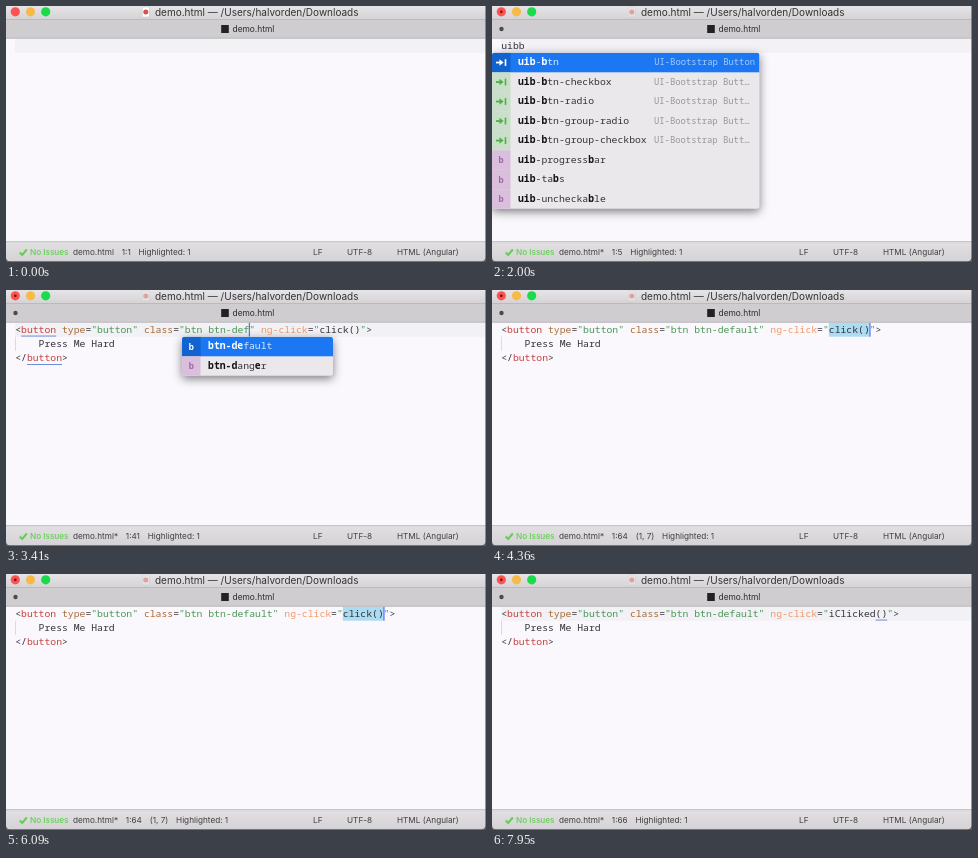
An HTML page with a canvas for the animation above (8 s loop, 480 by 256 pixels).

```html
<!DOCTYPE html>
<html lang="en">
<head>
<meta charset="utf-8">
<style>
  html, body { margin: 0; width: 100%; height: 100%; overflow: hidden; background: #faf8fd; }
  canvas { display: block; width: 480px; height: 256px; }
</style>
</head>
<body>
<canvas id="stage"></canvas>
<script>
const canvas = document.getElementById('stage');
const ctx = canvas.getContext('2d');
const ratio = window.devicePixelRatio || 1;
canvas.width = 480 * ratio;
canvas.height = 256 * ratio;

const LOOP = 8000, LEFT = 9.2, CELL = 5.85, ROW = 19.5;
const EDITOR_TOP = 32.5, LINE = 14.2, STATUS_TOP = 235.4;
const UI = 'Inter, sans-serif';
const MONO = '"Noto Sans Mono", monospace';
const CODE = `500 9.75px ${MONO}`;
const INK = '#343238';

// Completion entries: name, then an optional description for snippets.
const accordion = 'UI-Bootstrap Acco…', button = 'UI-Bootstrap Butt…';
const allSnippets = [
  ['uib-accordion', accordion], ['uib-btn', 'UI-Bootstrap Button'],
  ['uib-alert', 'UI-Bootstrap Alert'], ['uib-accordion-', accordion],
  ['uib-accordion-group', accordion], ['uib-accordion-heading', accordion],
  ['uib-btn-checkbox', button], ['uib-btn-radio', button],
  ['uib-collapse', 'UI-Bootstrap Coll…'], ['uib-dropdown', 'UI-Bootstrap Drop…']
];
const buttonSnippets = [
  ['uib-btn', 'UI-Bootstrap Button'], ['uib-btn-checkbox', button],
  ['uib-btn-radio', button], ['uib-btn-group-radio', button],
  ['uib-btn-group-checkbox', button],
  ['uib-progressbar'], ['uib-tabs'], ['uib-uncheckable']
];
const buttonClasses = [['btn-default'], ['btn-danger']];
const imageClasses = [['img-circle']];

// Editor states in order of time.
const states = [];
const word = (at, text, list, query) =>
  states.push({ at, line: text, caret: text.length, list, query, start: 0 });

const openTag = (style, handler) =>
  `<button type="button" class="btn btn-${style}" ng-click="${handler}">`;

function editClass(at, style, selected = 0, list, query) {
  states.push({ at, line: openTag(style, 'click()'), caret: 37 + style.length,
    selected, list, query, start: 33, full: true });
}
function editHandler(at, typed, tail = '', selected = 0, list) {
  states.push({ at, line: openTag('default', typed + tail), caret: 56 + typed.length,
    selected, list, query: typed, start: 56, full: true, paired: tail !== '' });
}

word(0, '');
word(330, 'u');
word(480, 'ui');
word(620, 'uib', allSnippets, 'uib');
word(1600, 'uibb', buttonSnippets, 'uibb');
editClass(2450, 'default', 7);
editClass(3120, 'd', 0, buttonClasses, 'btn-d');
editClass(3250, 'de', 0, buttonClasses, 'btn-de');
editClass(3370, 'def', 0, buttonClasses, 'btn-de');
editClass(3460, 'def', 0, buttonClasses.slice(0, 1), 'btn-def');
editClass(3900, 'default');
editHandler(4100, 'click()', '', 7);
editHandler(6200, 'i');
editHandler(6340, 'iC', '', 0, imageClasses);
editHandler(6480, 'iCl', '', 0, imageClasses);
['iCli', 'iClic', 'iClick', 'iClicke', 'iClicked'].forEach((typed, i) =>
  editHandler(6640 + i * 130, typed));
editHandler(7350, 'iClicked(', ')');

function box(x, y, w, h, color) {
  ctx.fillStyle = color;
  ctx.fillRect(x, y, w, h);
}
function disc(x, y, r, color) {
  ctx.fillStyle = color;
  ctx.beginPath();
  ctx.arc(x, y, r, 0, 7);
  ctx.fill();
}
function label(text, x, y, font, color) {
  ctx.font = font;
  ctx.fillStyle = color;
  ctx.fillText(text, x, y);
  return ctx.measureText(text).width;
}
function gradient(y, h, top, bottom) {
  const fill = ctx.createLinearGradient(0, y, 0, y + h);
  fill.addColorStop(0, top);
  fill.addColorStop(1, bottom);
  box(0, y, 480, h, fill);
}
const column = n => LEFT + n * CELL;

function drawChrome(modified) {
  gradient(0, 13, '#e6e4e6', '#d5d3d5');
  box(0, 13, 480, EDITOR_TOP - 13, '#cfcdcf');
  box(0, 13, 480, 0.7, '#b5b3b5');
  box(0, EDITOR_TOP - 0.8, 480, 0.8, '#b7b5b9');
  ['#fc5350', '#f7ba47', '#1bdb4a'].forEach((c, i) => disc(9.3 + i * 15.2, 5.8, 4.6, c));
  if (modified) disc(9.3, 5.8, 1.4, '#7c1210');

  ctx.globalAlpha = modified ? 0.45 : 1;
  box(136, 0.8, 7.6, 10.4, '#bbb9bb');
  box(136.4, 1.2, 6.8, 9.6, '#fff');
  disc(139.8, 6, 2.5, '#d9534a');
  ctx.globalAlpha = 1;
  label('demo.html — /Users/halvorden/Downloads', 149, 9.6, `10px ${UI}`, '#343234');

  box(215.2, 19, 7.6, 8, '#222');
  label('demo.html', 226.5, 26.2, `8.4px ${UI}`, '#2c2a2c');
  if (modified) disc(9.5, 23, 2.2, '#4b494b');
}

function drawStatus(state, saved) {
  const font = `8.2px ${UI}`, y = 249.3;
  gradient(STATUS_TOP, 256 - STATUS_TOP, '#e2e0e2', '#d4d2d4');
  box(0, STATUS_TOP, 480, 0.8, '#bab8ba');
  ctx.strokeStyle = '#62cf52';
  ctx.lineWidth = 2;
  ctx.beginPath();
  ctx.moveTo(13.7, 246.5);
  ctx.lineTo(16.2, 249);
  ctx.lineTo(20.8, 243.5);
  ctx.stroke();
  label('No Issues', 24, y, `500 8.2px ${UI}`, '#62cf52');

  const parts = [saved ? 'demo.html' : 'demo.html*', `1:${state.caret + 1}`];
  if (state.selected) parts.push(`(1, ${state.selected})`);
  parts.push('Highlighted: 1');
  let x = 67;
  for (const part of parts) x += label(part, x, y, font, '#403e40') + 7.8;
  label('LF', 307, y, font, '#403e40');
  label('UTF-8', 341, y, font, '#403e40');
  label('HTML (Angular)', 391, y, font, '#403e40');
}

// Dark surroundings showing past the window's right and bottom edges.
function drawWindowEdge() {
  ctx.fillStyle = '#5a585a';
  ctx.beginPath();
  ctx.rect(0, 0, 480, 256);
  ctx.roundRect(0, 0, 479.4, 255.2, [0, 0, 4, 4]);
  ctx.fill('evenodd');
}

function drawCode(line, y) {
  let handler = false;
  for (const match of line.matchAll(/button(?=[ >])|[\w-]+(?==)|"[^"]*"|[^"\w]+|\w+/g)) {
    const token = match[0], x = column(match.index);
    let color = INK;
    if (token === 'button') color = '#c4403c';
    else if (line[match.index + token.length] === '=') {
      handler = token === 'ng-click';
      color = handler ? '#ee9a6c' : '#a86a35';
    } else if (token[0] === '"') color = '#4a9656';
    if (token[0] === '"' && handler) {
      label('"', x, y, CODE, color);
      label(token.slice(1, -1), x + CELL, y, CODE, INK);
      label('"', x + CELL * (token.length - 1), y, CODE, color);
    } else label(token, x, y, CODE, color);
  }
}

function underline(from, count, y) {
  box(column(from), y, count * CELL, 0.9, '#5c80dc');
}

function drawEditor(state, age) {
  box(0, EDITOR_TOP, 480, STATUS_TOP - EDITOR_TOP, '#faf8fd');
  if (!state.selected) box(9, EDITOR_TOP, 471, LINE, '#f1f1f6');
  else box(column(state.caret - state.selected), EDITOR_TOP, state.selected * CELL, LINE, '#abdcf2');

  drawCode(state.line, 42.6);
  if (state.full) {
    box(9, EDITOR_TOP + LINE, 0.8, LINE, '#d4d2d8');
    label('Press Me Hard', column(4), 42.6 + LINE, CODE, INK);
    drawCode('</button>', 42.6 + 2 * LINE);
  }
  // Matching brackets take precedence over matching tags.
  if (state.paired) underline(state.caret - 1, 2, 45.6);
  else if (state.full && !state.selected) {
    underline(1, 6, 45.6);
    underline(2, 6, 45.6 + 2 * LINE);
  }
  if (state.at > 0 && age % 800 < 400) box(column(state.caret) - 0.4, EDITOR_TOP, 1.2, LINE, '#526fff');
}

function drawArrow(x, y, color) {
  box(x - 5, y - 0.9, 5, 1.8, color);
  box(x + 3.7, y - 3.4, 1.6, 6.8, color);
  ctx.fillStyle = color;
  ctx.beginPath();
  ctx.moveTo(x - 1.5, y - 3.3);
  ctx.lineTo(x + 2.6, y);
  ctx.lineTo(x - 1.5, y + 3.3);
  ctx.fill();
}

function drawName(name, query, x, y, active) {
  let matched = 0;
  [...name].forEach((char, i) => {
    const hit = matched < query.length && char === query[matched].toLowerCase();
    if (hit) matched++;
    const color = active ? (hit ? '#fff' : '#d9eaff') : (hit ? '#111' : '#343238');
    label(char, x + i * CELL, y, hit ? CODE.replace('500', 'bold') : CODE, color);
  });
}

function drawPopup({ list, query, start }) {
  const x = Math.max(0, column(start) - 26.2), y = 46.8;
  const w = list[0][1] ? 267.5 : 151, h = list.length * ROW;
  ctx.save();
  ctx.beginPath();
  ctx.roundRect(x, y, w, h, 3);
  ctx.save();
  ctx.shadowColor = 'rgba(0,0,0,.5)';
  ctx.shadowBlur = 10 * ratio;
  ctx.shadowOffsetY = 3 * ratio;
  ctx.fillStyle = '#ebe8ec';
  ctx.fill();
  ctx.restore();
  ctx.clip();

  list.forEach(([name, description], i) => {
    const top = y + i * ROW, middle = top + ROW / 2, active = i === 0;
    if (active) box(x, top, w, ROW, '#1b78f2');
    box(x, top, 18.5, ROW, active ? '#1263cf' : description ? '#cadfc9' : '#dabfdd');
    if (description) drawArrow(x + 9, middle, active ? '#fff' : '#4cb43e');
    else label('b', x + 6.6, middle + 3, `bold 8.6px ${MONO}`, active ? '#fff' : '#a164aa');
    drawName(name, query, x + 26, middle + 2.8, active);
    if (description) {
      const font = `500 8.85px ${MONO}`;
      ctx.font = font;
      const left = description.endsWith('…') ? 162 : 263 - ctx.measureText(description).width;
      label(description, left, middle + 2.8, font, active ? '#a9cbf8' : '#98959b');
    }
  });
  ctx.restore();
}

function draw(now) {
  const time = now % LOOP;
  const state = states.findLast(s => s.at <= time);
  ctx.setTransform(ratio, 0, 0, ratio, 0, 0);
  drawEditor(state, time - state.at);
  drawChrome(time >= 330);
  drawStatus(state, time < 900);
  drawWindowEdge();
  if (state.list) drawPopup(state);
}

const began = performance.now();
function tick() {
  draw(performance.now() - began);
  requestAnimationFrame(tick);
}
tick();
</script>
</body>
</html>
```
